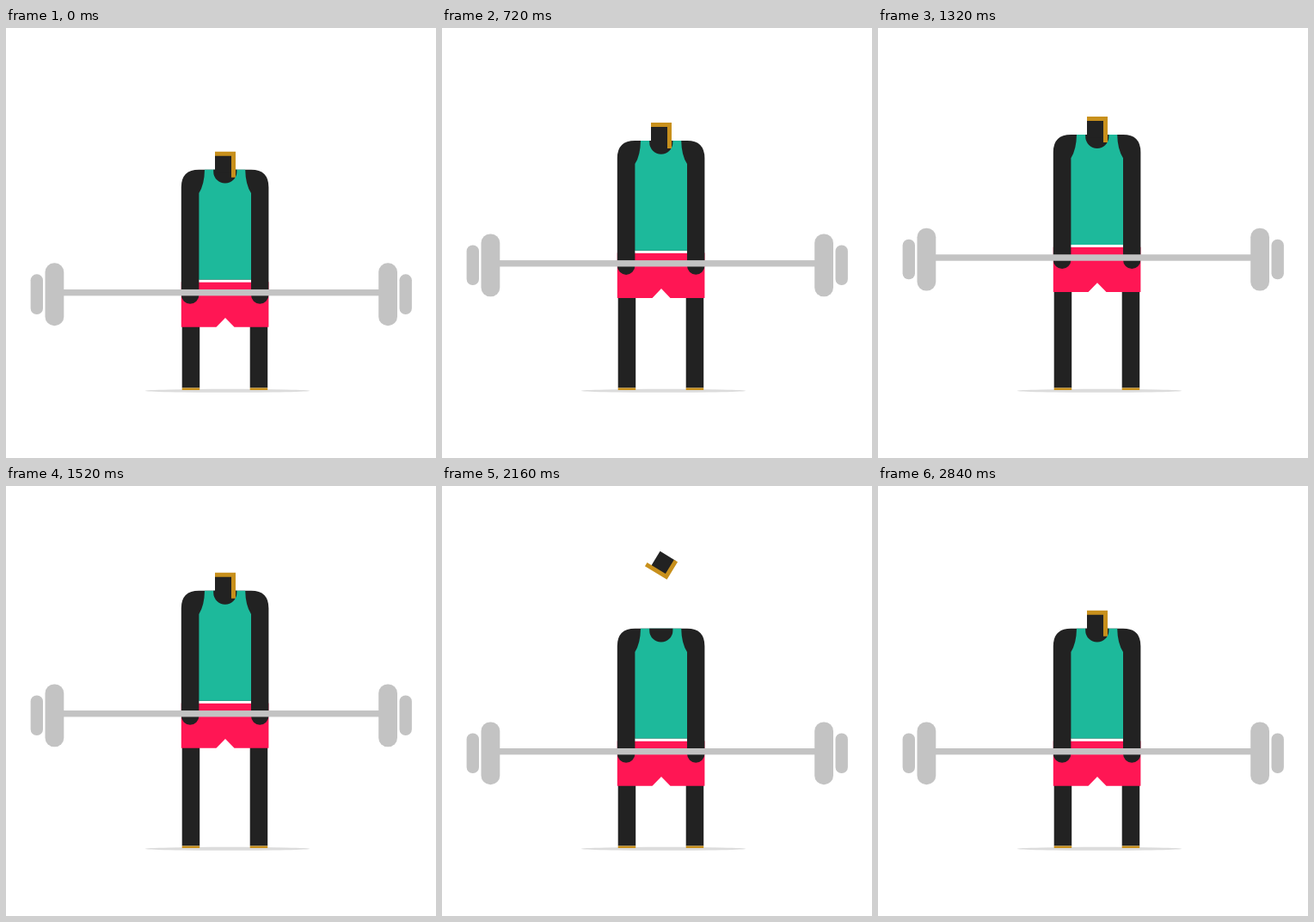
An HTML page for the animation above (2.92 s loop, 500x500 px).

```html
<!DOCTYPE html>
<html lang="en">
<head>
<meta charset="utf-8">
<title>Weightlifter</title>
<style>
  html, body { margin: 0; width: 100%; height: 100%; overflow: hidden; background: #fff; }
  svg { display: block; width: 100vw; height: 100vh; }
  .dark { fill: #222; }
  .gold { fill: #c8901c; }
  .steel { fill: #c3c3c3; }
</style>
</head>
<body>
<svg viewBox="0 0 500 500">
  <ellipse cx="257.5" cy="421.8" rx="96" ry="2" fill="#dcdcdc"/>

  <g id="legs" class="dark">
    <rect class="leg" x="204.7" width="20.5"/>
    <rect class="leg" x="283.7" width="20.5"/>
  </g>
  <path class="gold" d="M204.7 418.5h20.5v2.4h-20.5zM283.7 418.5h20.5v2.4h-20.5z"/>

  <g id="body">
    <path fill="#ff1654" d="M203.8 296.4H305.4V348.8H265.5L255 338L244.5 348.8H203.8Z"/>
    <rect x="224" y="293" width="61.5" height="3.6" fill="#fff"/>
    <path class="dark" d="M224.4 165.8H285Q305.4 165.8 305.4 186.2V311.5A10.2 10.2 0 0 1 285 311.5V293.6H224.4V311.5A10.3 10.3 0 0 1 203.8 311.5V186.2Q203.8 165.8 224.4 165.8Z"/>
    <path fill="#1db99b" d="M231 165.8H278.2Q278.5 183 285 193V293.6H224.4V193Q230.7 183 231 165.8Z"/>
    <path class="dark" d="M241.2 165.8H268.4V168A13.6 13.6 0 0 1 241.2 168Z"/>
    <g class="steel">
      <rect x="60" y="305" width="380" height="7.4"/>
      <rect x="45.5" y="274.4" width="21.8" height="72.8" rx="10.5"/>
      <rect x="433.2" y="274.4" width="21.8" height="72.8" rx="10.5"/>
      <rect x="28.6" y="287.4" width="14.4" height="46.6" rx="7"/>
      <rect x="457.5" y="287.4" width="14.4" height="46.6" rx="7"/>
    </g>
  </g>

  <!-- Head drawn around its own pivot -->
  <g id="head">
    <rect class="dark" x="-12" y="-12" width="21" height="21"/>
    <path class="gold" d="M-12 -15H12V15H7V-10H-12Z"/>
  </g>
</svg>
<script>
  const LOOP = 2920, STEP = 40, LAST = 2840;
  const REST_HEAD = 159.8, APEX = 88, RELEASE = 1680;
  const body = document.getElementById('body');
  const head = document.getElementById('head');
  const legs = document.querySelectorAll('.leg');

  const progress = (t, from, to) => Math.min(1, Math.max(0, (t - from) / (to - from)));
  const smooth = p => p * p * (3 - 2 * p);
  const mix = (a, b, p) => a + (b - a) * p;

  // Quick pull, long slow strain, sudden drop
  function bodyOffset(t) {
    if (t < 320) return mix(0, -30.4, smooth(progress(t, -40, 320)));
    if (t < 1560) return mix(-30.4, -44.4, progress(t, 320, 1560));
    if (t < RELEASE) return mix(-44.4, -45, progress(t, 1560, RELEASE));
    return mix(-45, 0, smooth(progress(t, RELEASE, 2040)));
  }

  function headY(t) {
    if (t < RELEASE) return REST_HEAD + bodyOffset(t);
    if (t < 2280) return mix(REST_HEAD - 45, APEX, smooth(progress(t, RELEASE, 2280)));
    return mix(APEX, REST_HEAD, smooth(progress(t, 2280, LAST)));
  }

  function headAngle(t) {
    const left = 1 - progress(t, RELEASE, 2825);
    return -360 * (1 - left * left);
  }

  function draw(now) {
    const t = Math.min(LAST, Math.floor((now % LOOP) / STEP) * STEP);
    const y = bodyOffset(t);
    body.setAttribute('transform', `translate(0 ${y})`);
    head.setAttribute('transform', `translate(255 ${headY(t)}) rotate(${headAngle(t)})`);
    for (const leg of legs) {
      leg.setAttribute('y', 345 + y);
      leg.setAttribute('height', 73.5 - y);
    }
  }

  const start = performance.now();
  function tick() {
    draw(performance.now() - start);
    requestAnimationFrame(tick);
  }
  tick();
</script>
</body>
</html>
```
